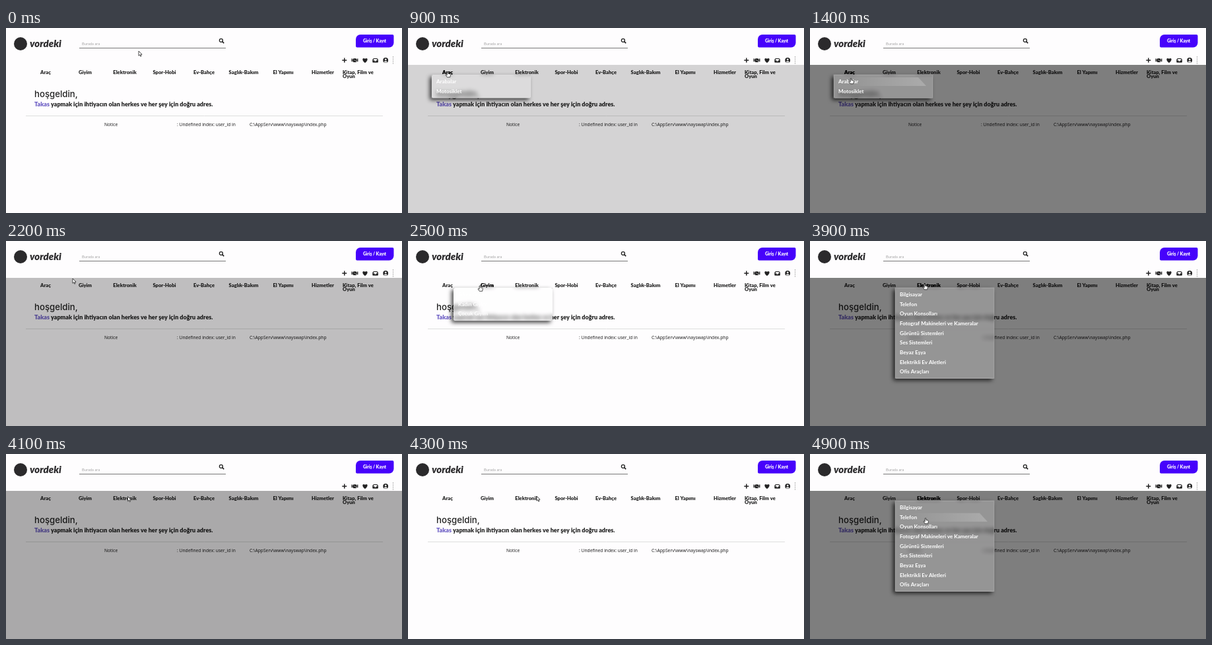
These frames come from a looping animation (600x281 px, 5 s). An HTML page with a canvas:

```html
<!DOCTYPE html>
<html lang="tr">
<head>
<meta charset="utf-8">
<title>vordeki</title>
<style>
  html, body { margin: 0; width: 100%; height: 100%; overflow: hidden; background: #fefdfe; }
  canvas { display: block; width: 600px; height: 281px; }
</style>
</head>
<body>
<canvas id="stage"></canvas>
<script>
const W = 600, H = 281, LOOP = 5000, STEP = 100;
const SCALE = window.devicePixelRatio || 1;
const PAPER = '#fefdfe', INK = '#222';
const LATO = 'Lato, sans-serif', NOTO = '"Noto Sans", sans-serif', INTER = 'Inter, sans-serif';
const LABEL_FONT = '900 7.6px ' + LATO;
const COL = 60, MENU_Y = 71, MENU_W = 150, ROW = 14.63, FADE = 300, GLOW_DELAY = 100;

const labels = ['Araç', 'Giyim', 'Elektronik', 'Spor-Hobi', 'Ev-Bahçe', 'Saglık-Bakım', 'El Yapımı', 'Hizmetler'];
const menus = [
  ['Arabalar', 'Motosiklet'],
  ['Erkek Giyim', 'Kadın Giyim', 'Çocuk Giyim'],
  ['Bilgisayar', 'Telefon', 'Oyun Konsolları', 'Fotograf Makineleri ve Kameralar', 'Görüntü Sistemleri',
    'Ses Sistemleri', 'Beyaz Eşya', 'Elektrikli Ev Aletleri', 'Ofis Araçları']
];
const visits = [
  { menu: 0, from: 800, to: 2050 },
  { menu: 1, from: 2500, to: 3700 },
  { menu: 2, from: 3700, to: 4000 },
  { menu: 2, from: 4400, to: LOOP }
];
// Resting points of the pointer: time, x, y
const stops = [[0, 201, 35], [900, 60, 66], [1400, 62, 76], [1800, 66, 92], [2200, 101, 57],
  [3000, 126, 90], [3900, 174, 65], [4300, 195, 64], [4900, 175, 97]];

const clamp = v => Math.max(0, Math.min(1, v));
const ease = k => k * k * (3 - 2 * k);

function layer(el) {
  el.width = Math.round(W * SCALE);
  el.height = Math.round(H * SCALE);
  const c = el.getContext('2d');
  c.scale(SCALE, SCALE);
  return c;
}

const ctx = layer(document.getElementById('stage'));
const page = document.createElement('canvas');

function text(c, str, x, y, font, color = INK, align = 'left') {
  c.font = font;
  c.fillStyle = color;
  c.textAlign = align;
  c.fillText(str, x, y);
}

function line(c, color, width, x1, y1, x2, y2) {
  c.strokeStyle = color;
  c.lineWidth = width;
  c.beginPath();
  c.moveTo(x1, y1);
  c.lineTo(x2, y2);
  c.stroke();
}

function disc(c, color, x, y, r, ry = r) {
  c.fillStyle = color;
  c.beginPath();
  c.ellipse(x, y, r, ry, 0, 0, Math.PI * 2);
  c.fill();
}

function panel(c, color, x, y, w, h, r) {
  c.fillStyle = color;
  c.beginPath();
  c.roundRect(x, y, w, h, r);
  c.fill();
}

const icons = [
  function plus(c) {
    line(c, INK, 1.5, -3.5, 0, 3.5, 0);
    line(c, INK, 1.5, 0, -3.5, 0, 3.5);
  },
  function handshake(c) {
    panel(c, INK, -5, -2.4, 1.3, 4.4, 0);
    panel(c, INK, 3.7, -2.4, 1.3, 4.4, 0);
    panel(c, INK, -3.2, -2.8, 6.4, 5.8, 2);
    line(c, PAPER, 0.6, -1, -0.4, 2.4, 1.6);
  },
  function heart(c) {
    c.fillStyle = INK;
    c.fill(new Path2D('M0 4C-6 -.6 -3.6 -4.8 0 -2.2C3.6 -4.8 6 -.6 0 4Z'));
  },
  function tray(c) {
    panel(c, INK, -4.3, -3, 8.6, 6.5, [3, 3, 1, 1]);
    panel(c, PAPER, -3, -2, 6, 2.2, [2, 2, 0, 0]);
    panel(c, PAPER, -1.2, 0, 2.4, 1.4, 0.5);
  },
  function account(c) {
    disc(c, INK, 0, 0, 3.9);
    disc(c, PAPER, 0, -1.1, 1.4);
    disc(c, PAPER, 0, 2.4, 2.3, 1.2);
  }
];

function drawLabel(c, i, color) {
  text(c, labels[i], COL * (i + 1), 70, LABEL_FONT, color, 'center');
}

function drawHeader(c) {
  disc(c, '#2b2a2c', 22, 24, 10);
  text(c, 'vordeki', 36, 29, 'italic 900 15px ' + LATO, '#2b2a2c');

  text(c, 'Burada ara', 115, 26, '5.8px ' + LATO, '#a5a5a5');
  line(c, '#777', 1, 111, 30.5, 333, 30.5);
  c.strokeStyle = INK;
  c.lineWidth = 1.3;
  c.beginPath();
  c.arc(325.9, 18.8, 2.5, 0, Math.PI * 2);
  c.stroke();
  line(c, INK, 1.7, 327.7, 20.6, 330.2, 23.1);

  panel(c, '#4602fb', 530, 10, 57.5, 19.5, [7, 2, 7, 2]);
  text(c, 'Giriş / Kayıt', 558.5, 22, '900 6.5px ' + LATO, '#fff', 'center');

  icons.forEach((icon, i) => {
    c.save();
    c.translate(512.8 + i * 15.6, 49);
    icon(c);
    c.restore();
  });
  c.setLineDash([2, 1.2]);
  line(c, '#999', 0.8, 586.5, 43, 586.5, 55);
  c.setLineDash([]);
}

function drawPage(c) {
  panel(c, PAPER, 0, 0, W, H, 0);
  drawHeader(c);

  labels.forEach((_, i) => drawLabel(c, i, INK));
  text(c, 'Kitap, Film ve', 510, 70, LABEL_FONT);
  text(c, 'Oyun', 510, 76.3, LABEL_FONT);

  text(c, 'hoşgeldin,', 43, 104.5, '500 13.2px ' + INTER);
  const bold = '900 9.03px ' + LATO;
  text(c, 'Takas', 43, 119, bold, '#6b5cc4');
  const indent = c.measureText('Takas ').width;
  text(c, 'yapmak için ihtiyacın olan herkes ve her şey için doğru adres.', 43 + indent, 119, bold);
  line(c, '#dedede', 1, 30, 133.5, 571, 133.5);

  const small = '6.68px ' + NOTO;
  text(c, 'Notice', 149, 149, small);
  text(c, ': Undefined index: user_id in', 259, 149, small);
  text(c, 'C:\\AppServ\\www\\nayswap\\index.php', 369, 149, small);
}

function pointerAt(t) {
  const i = stops.findIndex(s => s[0] > t);
  if (i < 0) return stops[stops.length - 1].slice(1);
  const [t0, x0, y0] = stops[i - 1], [t1, x1, y1] = stops[i];
  const k = ease((t - t0) / (t1 - t0));
  return [x0 + (x1 - x0) * k, y0 + (y1 - y0) * k];
}

// Each visit fades the page to dark and back; neighbours cross-fade
function shadeAt(t) {
  const level = v => clamp(Math.min((t - v.from) / FADE, 1 - (t - v.to) / FADE));
  return 0.5 * clamp(visits.reduce((sum, v) => sum + level(v), 0));
}

function rowAt(t) {
  return Math.floor((pointerAt(t)[1] - MENU_Y - 3) / ROW);
}

function drawBack(alpha) {
  ctx.drawImage(page, 0, 0, W, H);
  ctx.filter = 'none';
  panel(ctx, `rgba(0,0,0,${alpha})`, 0, 56, W, H - 56, 0);
}

function drawGlow(x, y) {
  const g = ctx.createLinearGradient(x + 20, 0, x + 135, 0);
  g.addColorStop(0, 'rgba(255,255,255,0)');
  g.addColorStop(1, 'rgba(255,255,255,0.2)');
  ctx.fillStyle = g;
  ctx.beginPath();
  ctx.moveTo(x, y);
  ctx.lineTo(x + 128, y);
  ctx.lineTo(x + 140, y + 13);
  ctx.lineTo(x, y + 13);
  ctx.fill();
}

function drawMenu(index, t, alpha) {
  const items = menus[index];
  const x = Math.max(36, 9 + index * COL), h = items.length * ROW + 6;

  ctx.save();
  ctx.shadowColor = 'rgba(0,0,0,0.75)';
  ctx.shadowBlur = 6 * SCALE;
  ctx.shadowOffsetX = -3 * SCALE;
  ctx.shadowOffsetY = 3 * SCALE;
  panel(ctx, '#777', x, MENU_Y, MENU_W, h, 2);
  ctx.restore();

  // frosted glass
  ctx.save();
  ctx.clip();
  ctx.filter = `blur(${3 * SCALE}px)`;
  drawBack(alpha);
  panel(ctx, 'rgba(255,255,255,0.18)', x, MENU_Y, MENU_W, h, 2);
  const row = rowAt(t);
  if (row >= 0 && row === rowAt(t - GLOW_DELAY)) drawGlow(x, MENU_Y + 4 + row * ROW);
  ctx.restore();

  ctx.strokeStyle = 'rgba(255,255,255,0.3)';
  ctx.lineWidth = 0.8;
  ctx.strokeRect(x, MENU_Y, MENU_W, h);

  items.forEach((item, i) => text(ctx, item, x + 7, 84.2 + i * ROW, 'bold 8px ' + LATO, '#fff'));
}

const arrow = new Path2D('M0 0V7.2L1.7 5.7L2.8 8.2L4 7.7L2.9 5.2H5.1Z');
const hand = new Path2D('M-.8 .8Q0 -.4 .9 .8V3.2L3.6 3.9Q4.6 4.2 4.4 5.4L3.7 8.8H-.6L-2.8 5.7Q-2.8 4.6 -1.7 5L-.8 5.8Z');

function drawPointer(shape, x, y) {
  ctx.save();
  ctx.translate(x, y);
  ctx.lineJoin = 'round';
  ctx.lineWidth = 0.8;
  ctx.strokeStyle = INK;
  ctx.fillStyle = '#fff';
  ctx.fill(shape);
  ctx.stroke(shape);
  ctx.restore();
}

function draw(t) {
  const alpha = shadeAt(t);
  const visit = visits.find(v => t >= v.from && t < v.to);
  drawBack(alpha);
  if (visit) {
    drawLabel(ctx, visit.menu, '#000');
    drawMenu(visit.menu, t, alpha);
  }
  drawPointer(visit ? hand : arrow, ...pointerAt(t));
}

drawPage(layer(page));
const start = performance.now();
function tick() {
  const t = (performance.now() - start) % LOOP;
  draw(Math.floor(t / STEP) * STEP);
  requestAnimationFrame(tick);
}
tick();
</script>
</body>
</html>
```
